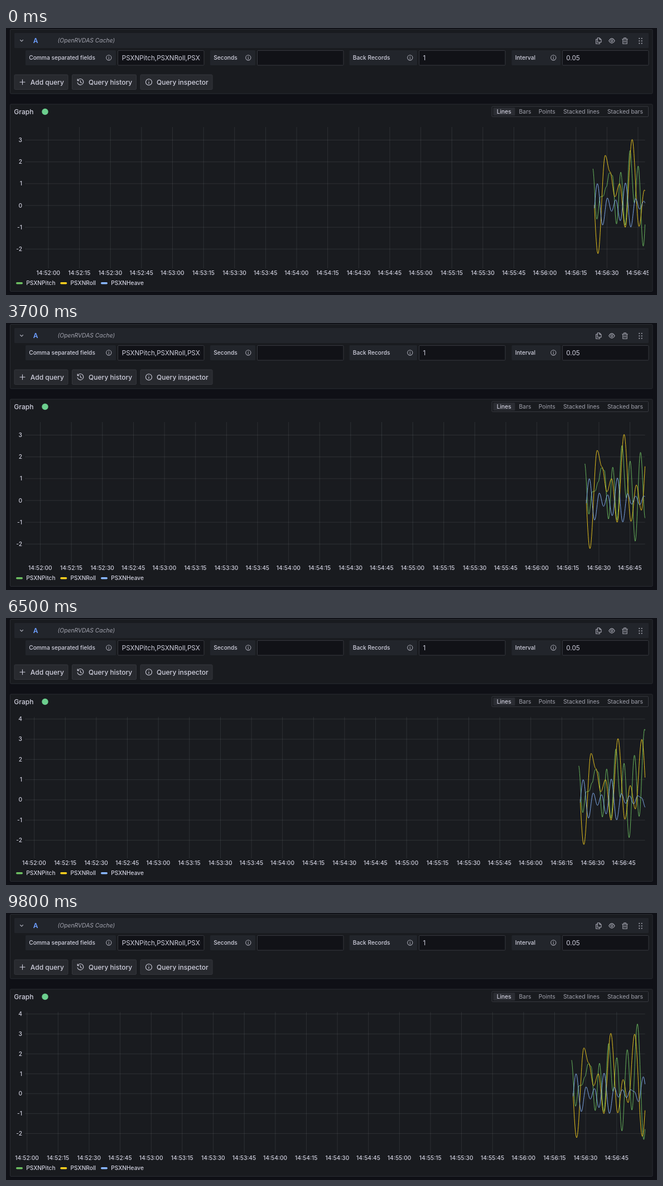
An HTML page for the animation above (9900 ms loop, 1167 by 480 pixels).

```html
<!DOCTYPE html>
<html lang="en">
<head>
<meta charset="utf-8">
<title>Live query graph</title>
<style>
  html, body { margin: 0; width: 100%; height: 100%; overflow: hidden; background: #0f1016; }
  svg { display: block; }
  text { font: 500 10.2px Inter, sans-serif; fill: #d0d0de; white-space: pre; }
  .body { font-size: 12.04px; }
  .value { font-size: 11.65px; font-weight: 400; }
  .muted { fill: #a2a3ae; font-weight: 400; font-size: 10.32px; }
  .panel { fill: #191b1f; stroke: #2b2d33; }
  .bar { fill: #22252b; }
  .input { fill: #111217; stroke: #36383f; }
  .button { fill: #282a2f; stroke: #34363c; }
  .icon { fill: none; stroke: #a8a9b4; stroke-width: 1.1; stroke-linecap: round; stroke-linejoin: round; }
  .strong { stroke: #d0d0de; }
  .dots { fill: #a8a9b4; }
  .grid { fill: none; stroke: #f0faff; stroke-opacity: .105; stroke-width: .9; }
  .series { fill: none; stroke-width: .9; stroke-linejoin: round; }
  #times { text-anchor: middle; }
  #values { text-anchor: end; }
</style>
</head>
<body>
<svg width="1167" height="480" viewBox="0 0 1167 480">
  <defs>
    <clipPath id="fieldClip"><rect x="207" y="42" width="141.3" height="24"/></clipPath>
    <clipPath id="axisClip"><rect x="8" y="170" width="1144" height="280"/></clipPath>
    <g id="info" class="icon"><circle r="4.6"/><path d="M0-.3V2.2M0-2.2v.1"/></g>
  </defs>

  <rect class="panel" x="7.5" y="2.5" width="1151.5" height="115.5" rx="1.5"/>
  <rect class="bar" x="15" y="9" width="1137" height="27" rx="1.5"/>
  <path class="icon" d="M25.5 21.5l2.5 2.5 2.5-2.5"/>
  <text class="body" x="48.8" y="27" style="fill:#6e9fff;font-weight:600">A</text>
  <text class="muted" x="92.5" y="26.3" style="font-style:italic">(OpenRVDAS Cache)</text>

  <g class="icon">
    <path d="M1060.3 17.8h3.7l3 3v4.7h-6.7zM1064 17.8v3h3M1060.3 20.3h-2.6v7.9h6.7v-2.7"/>
    <path d="M1080.8 23q5.2-8.2 10.4 0q-5.2 8.2-10.4 0z"/><circle cx="1086" cy="23" r="1.7"/>
    <path d="M1104.6 20h9.8M1105.8 20v8.2h7.4V20M1107.7 20v-2.2h3.6V20M1108.2 22.6v3M1110.8 22.6v3"/>
  </g>
  <g class="dots" id="grip"></g>

  <g id="fields"></g>
  <text class="value" x="207.8" y="58.3" clip-path="url(#fieldClip)">PSXNPitch,PSXNRoll,PSXNHeave</text>
  <text class="value" x="747.5" y="58.3">1</text>
  <text class="value" x="1004.3" y="58.3">0.05</text>

  <g class="button">
    <rect x="15" y="84" width="96" height="26.5" rx="1.5"/>
    <rect x="118.5" y="84" width="115" height="26.5" rx="1.5"/>
    <rect x="241" y="84" width="129" height="26.5" rx="1.5"/>
  </g>
  <g class="icon strong">
    <path d="M25 97.2h9M29.5 92.7v9"/>
    <path d="M128.6 94.4a5.4 5.4 0 1 1-.5 3.6M128.2 91.8v2.9h2.9M133.5 94.5v3l2 1.3"/>
    <circle cx="256" cy="97.2" r="5.5"/><path d="M256 97v2.9M256 94.5v.1"/>
  </g>
  <text class="body" x="43.8" y="101.6">Add query</text>
  <text class="body" x="148" y="101.6">Query history</text>
  <text class="body" x="270" y="101.6">Query inspector</text>

  <rect class="panel" x="7.5" y="137" width="1151.5" height="336.5" rx="1.5"/>
  <text class="body" x="14.3" y="154.9">Graph</text>
  <circle cx="70" cy="150.5" r="5.7" fill="#6ccf8e"/>
  <rect class="panel" x="871" y="141" width="280.5" height="18.5" rx="1.5" style="stroke:#36383f"/>
  <rect x="873.5" y="143.2" width="39" height="14.4" rx="1.5" fill="#2b2d33"/>
  <text x="879.7" y="153.8">Lines</text>
  <text class="muted" x="919.6" y="153.8">Bars</text>
  <text class="muted" x="954.8" y="153.8">Points</text>
  <text class="muted" x="999" y="153.8">Stacked lines</text>
  <text class="muted" x="1078" y="153.8">Stacked bars</text>

  <path class="grid" id="grid"/>
  <g clip-path="url(#axisClip)"><g id="times"></g></g>
  <g id="values"></g>
  <g id="series"></g>
  <g id="legend"></g>
</svg>

<script>
const LOOP = 9900;
const SCROLL_SPEED = 3.9; // pixels per second
const PLOT = { left: 37.5, right: 1145.5, top: 178, height: 250.7 };
const TICK_START = 76, TICK_GAP = 55.63, TICK_COUNT = 20;
const DATA_START = 1052.2;

// Each wave eases from one turning value to the next; a swing of size s lasts pace + stretch * s pixels.
const SERIES = [
  { name: 'PSXNPitch', color: '#6fc263', legendX: 18, from: 0, start: -.6, pace: 5.05, stretch: 1.1,
    turns: [1.72, -.63, .4, .43, .85, 1.5, 1.38, -.85, 1.53, -.9, 2.52, .12, 1.81, -1.87, 2.21, -.82, 3.5, -2.3, 2.65] },
  { name: 'PSXNRoll', color: '#fad21e', legendX: 97.3, from: 2.5, start: -3.9, pace: 7.6, stretch: 1.2,
    turns: [2.2, -2.21, 2.3, 1.55, .4, 1, -1, 3.03, -.96, .71, -.45, 2.99, -2.14, 1.8] },
  { name: 'PSXNHeave', color: '#8ab8ff', legendX: 170, from: 2.5, start: -1.4, pace: 6.7, stretch: 1.45,
    turns: [-.8, 1, -.9, .34, -.27, .26, -.7, 1.03, -.99, .31, -.17, .2, -.2, .2, .1, -.4, .85, -.43] }
];

const byId = id => document.getElementById(id);
const ease = k => (1 - Math.cos(Math.PI * k)) / 2;

function add(parent, tag, attributes, text = '') {
  const node = document.createElementNS('http://www.w3.org/2000/svg', tag);
  for (const key in attributes) node.setAttribute(key, attributes[key]);
  node.textContent = text;
  return parent.appendChild(node);
}

function waveAt({ start, pace, stretch, turns }, u) {
  let begin = start;
  for (let i = 1; i < turns.length; i++) {
    const swing = turns[i] - turns[i - 1];
    const length = pace + stretch * Math.abs(swing);
    if (u <= begin + length) return turns[i - 1] + swing * ease((u - begin) / length);
    begin += length;
  }
  return turns.at(-1);
}

function sample(series, end) {
  const result = [];
  for (let u = series.from; u < end; u += .5) result.push([u, waveAt(series, u)]);
  result.push([end, waveAt(series, end)]);
  return result;
}

function addField(label, left, right) {
  const g = byId('fields');
  add(g, 'rect', { class: 'bar', x: left, y: 40, width: right - left, height: 27, rx: 1.5 });
  add(g, 'text', { x: left + 6.2, y: 56.8 }, label);
  add(g, 'use', { href: '#info', x: right - 12.7, y: 53.3 });
  add(g, 'rect', { class: 'input', x: right + 3.5, y: 40.5, width: 154.5, height: 26.5, rx: 1.5 });
}

addField('Comma separated fields', 35, 197);
addField('Seconds', 366, 447);
addField('Back Records', 615.5, 737);
addField('Interval', 906.5, 994);

for (let i = 0; i < 6; i++)
  add(byId('grip'), 'circle', { cx: 1135.3 + i % 2 * 4.4, cy: 18.8 + (i >> 1) * 4.4, r: 1.05 });

for (const s of SERIES) {
  s.path = add(byId('series'), 'path', { class: 'series', stroke: s.color });
  add(byId('legend'), 'rect', { x: s.legendX, y: 457, width: 12, height: 3.5, rx: 1.7, fill: s.color });
  add(byId('legend'), 'text', { x: s.legendX + 18.2, y: 461.6 }, s.name);
}

for (let i = 0; i < TICK_COUNT; i++) {
  const minute = 52 + Math.floor(i / 4), second = String(i % 4 * 15).padStart(2, '0');
  add(byId('times'), 'text', { x: TICK_START + i * TICK_GAP - .2, y: 444.3 }, `14:${minute}:${second}`);
}

const valueLabels = [];
for (let v = -2; v <= 4; v++) valueLabels.push([v, add(byId('values'), 'text', { x: 29 }, v)]);

function draw(seconds) {
  const shift = seconds * SCROLL_SPEED;
  const dataX = DATA_START - shift;
  const samples = SERIES.map(s => sample(s, PLOT.right - dataX));

  // Auto range: ten percent padding, rounded outwards to tenths
  const all = samples.flat().map(p => p[1]);
  const low = Math.min(...all), high = Math.max(...all), pad = (high - low) * .1;
  const min = Math.floor((low - pad) * 10) / 10, max = Math.ceil((high + pad) * 10) / 10;
  const yOf = v => PLOT.top + (max - v) / (max - min) * PLOT.height;

  let grid = '';
  for (let i = 0; i < TICK_COUNT; i++) {
    const x = TICK_START + i * TICK_GAP - shift;
    if (x >= PLOT.left && x <= PLOT.right) grid += `M${x} ${PLOT.top}V432.2`;
  }
  for (const [v, label] of valueLabels) {
    const visible = v >= min && v <= max;
    label.style.display = visible ? '' : 'none';
    label.setAttribute('y', yOf(v) + 3.5);
    if (visible) grid += `M34 ${yOf(v)}H${PLOT.right}`;
  }
  byId('grid').setAttribute('d', grid);
  byId('times').setAttribute('transform', `translate(${-shift})`);
  SERIES.forEach((s, i) => s.path.setAttribute('d',
    'M' + samples[i].map(([u, v]) => `${(dataX + u).toFixed(2)} ${yOf(v).toFixed(2)}`).join('L')));
}

const begin = performance.now();
function tick() {
  const time = (performance.now() - begin) % LOOP;
  draw(Math.floor(time / 100) / 10);
  requestAnimationFrame(tick);
}
tick();
</script>
</body>
</html>
```
